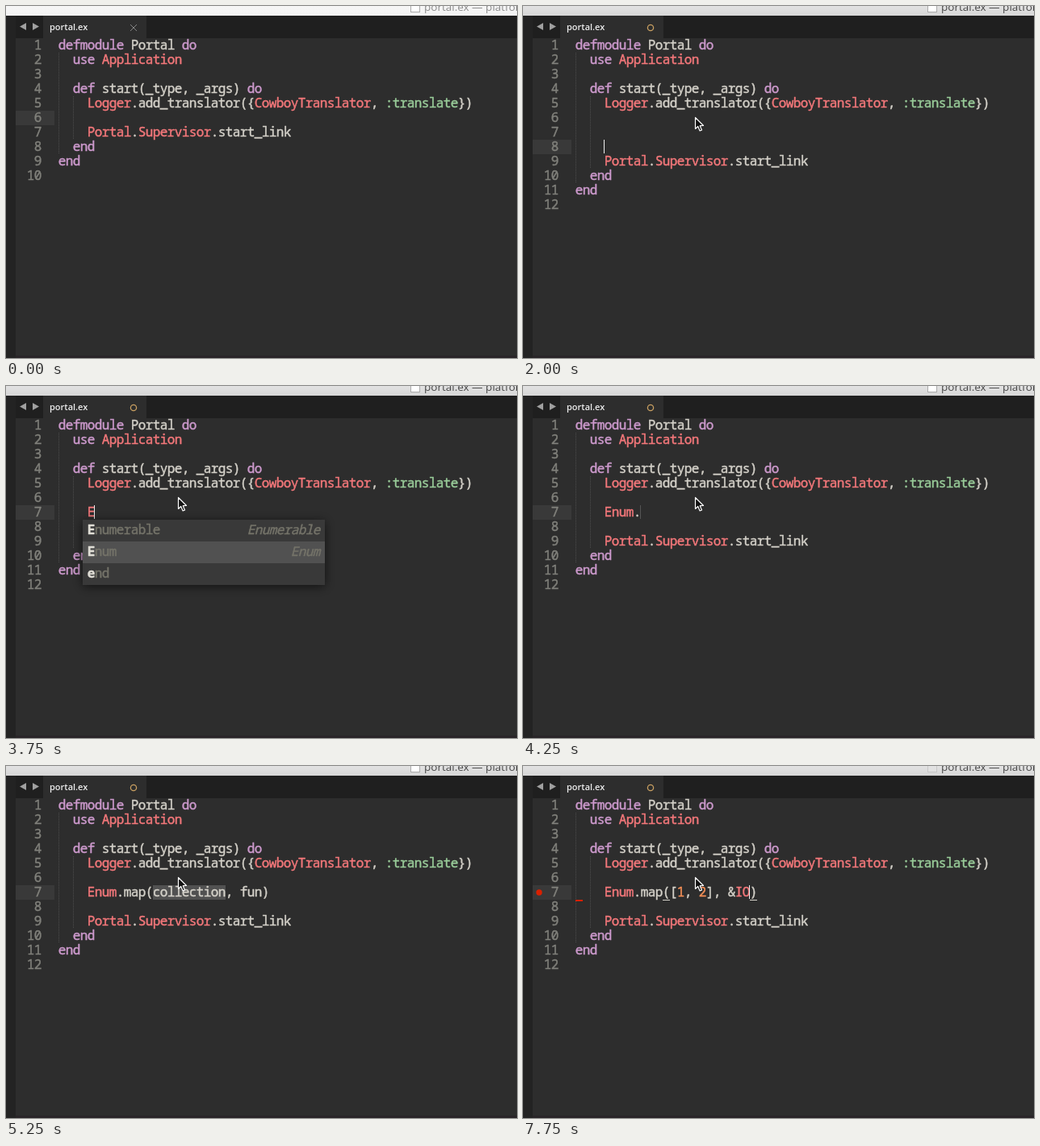
Animation, 633 px wide and 437 px high, one loop 8 s. Source, as an HTML page with a canvas:

```html
<!DOCTYPE html>
<html lang="en">
<head>
<meta charset="utf-8">
<title>Editor completion</title>
<style>
html, body { margin: 0; overflow: hidden; background: #2d2d2d; }
canvas { display: block; }
</style>
</head>
<body>
<canvas id="stage" width="633" height="437"></canvas>
<script>
const ctx = document.getElementById('stage').getContext('2d');
const LOOP = 8000, STEP = 250, CHAR = 9, ROW = 18, LEFT = 65, TOP = 40;
const MONO = '"Noto Sans Mono", monospace', SANS = '"Open Sans", sans-serif';
const FG = '#d3d0c8', DIM = '#747369', BG = '#2d2d2d', PURPLE = '#cc99cc',
  RED = '#f2777a', GREEN = '#99cc99', ORANGE = '#f99157';

const head = ['defmodule Portal do', '  use Application', '', '  def start(_type, _args) do',
  '    Logger.add_translator({CowboyTranslator, :translate})'];
const tail = ['    Portal.Supervisor.start_link', '  end', 'end', ''];

const enumMenu = { x: 95, width: 300, match: /^e/i, rows: ['Enumerable Enumerable', 'Enum Enum', 'end'] };
const mapMenu = { x: 140, width: 308, match: /ma/, rows: ['map map/2', 'max max/1', 'map_join map_join/1',
  'map_join map_join/3', 'map_reduce map_reduce/3', 'max_by max_by/2', 'filter_map filter_map/3', 'flat_map flat_map/2'] };

// Each step overrides part of the editor state from its time on.
const steps = [
  [0, { body: [''], row: 6, col: 4, caret: 0, picked: 0 }],
  [500, { active: true, mouse: [330, 14] }],
  [750, { mouse: [262, 84] }],
  [1000, { mouse: [222, 129] }],
  [1250, { mouse: [213, 138], caret: 1 }],
  [1500, { caret: .2 }],
  [1750, { body: ['', ''], row: 7, caret: 1, dirty: true }],
  [2000, { body: ['', '', ''], row: 8 }],
  [2250, { row: 7 }],
  [2750, { code: 'E', menu: enumMenu }],
  [3000, { picked: 1 }],
  [3250, { caret: .2 }],
  [3500, { caret: 0 }],
  [3750, { caret: 1 }],
  [4000, { code: 'Enum.', menu: null, picked: 0 }],
  [4250, { caret: .2 }],
  [4500, { code: 'Enum.m', menu: mapMenu, caret: 1 }],
  [4750, { code: 'Enum.ma' }],
  [5000, { caret: 0 }],
  [5250, { code: 'Enum.map(collection, fun)', menu: null, selection: [13, 10] }],
  [5750, { code: 'Enum.map([], fun)', selection: null, caret: 1, col: 14, pair: [13, 14] }],
  [6000, { code: 'Enum.map([1], fun)', col: 15, pair: [13, 15] }],
  [6250, { code: 'Enum.map([1, 2], fun)', col: 18, pair: [13, 18] }],
  [6750, { selection: [21, 3], caret: 0, pair: null }],
  [7000, { code: 'Enum.map([1, 2], &)', selection: null, caret: 1, col: 22, pair: [12, 22] }],
  [7250, { error: true, faded: true }],
  [7500, { code: 'Enum.map([1, 2], &I)', col: 23, pair: [12, 23] }],
  [7750, { code: 'Enum.map([1, 2], &IO)', col: 24, pair: [12, 24] }]
];

function rect(x, y, w, h, color) {
  ctx.fillStyle = color;
  ctx.fillRect(x, y, w, h);
}
function text(s, x, y, color, font) {
  ctx.font = font;
  ctx.fillStyle = color;
  ctx.fillText(s, x, y);
}
// Code text: tight 9px cells, thickened by a thin outline.
function mono(s, x, y, color, style = '500') {
  ctx.letterSpacing = '-0.6px';
  text(s, x - .3, y, color, `${style} 16px ${MONO}`);
  ctx.lineWidth = .45;
  ctx.strokeStyle = color;
  ctx.strokeText(s, x - .3, y);
  ctx.letterSpacing = '0px';
}
function monoRight(s, x, y, color, style) {
  mono(s, x - s.length * CHAR, y, color, style);
}
function polygon(points, color) {
  ctx.beginPath();
  points.forEach(p => ctx.lineTo(...p));
  ctx.closePath();
  ctx.fillStyle = color;
  ctx.fill();
}
function circle(x, y, r) {
  ctx.beginPath();
  ctx.arc(x, y, r, 0, 2 * Math.PI);
}
const rowY = n => TOP + (n - 1) * ROW;
const colX = n => LEFT + n * CHAR;

function tokenColor(word, line) {
  if (/^(defmodule|def|use|do|end)$/.test(word)) return PURPLE;
  if (/^:\w/.test(word)) return GREEN;
  if (/^\d/.test(word)) return ORANGE;
  return /^[A-Z]/.test(word) && !line.startsWith('defmodule') ? RED : FG;
}

function drawWindow(s) {
  rect(0, 0, 633, 437, BG);
  rect(0, 12, 12, 425, '#232323');
  rect(12, 12, 621, 28, '#1f1f1f');
  rect(46, 12, 128, 28, BG);
  rect(12, 434, 621, 3, '#292528');
  const bar = ctx.createLinearGradient(0, 0, 0, 12);
  bar.addColorStop(0, s.active ? '#e2e2e2' : '#f6f6f6');
  bar.addColorStop(1, s.active ? '#d6d6d6' : '#f3f3f3');
  rect(0, 0, 633, 12, bar);
  ctx.globalAlpha = s.faded ? .45 : 1;
  rect(501, 0, 12, 8, '#aaa');
  rect(502, 0, 10, 7, '#fff');
  ctx.globalAlpha = 1;
  text('portal.ex — platform', 518, 5.5, s.active ? '#484848' : '#8c8c8c', `13.5px ${SANS}`);
  polygon([[25, 21], [25, 30], [17, 25.5]], '#a0a0a0');
  polygon([[33, 21], [33, 30], [41, 25.5]], '#a0a0a0');
  text('portal.ex', 54, 30, '#eee', `600 11px ${SANS}`);
  ctx.lineWidth = 1.3;
  if (s.dirty) {
    circle(158, 27, 3.6);
    ctx.strokeStyle = '#c9a062';
  } else {
    ctx.lineWidth = 1;
    ctx.beginPath();
    ctx.moveTo(154, 23); ctx.lineTo(162, 31);
    ctx.moveTo(162, 23); ctx.lineTo(154, 31);
    ctx.strokeStyle = '#858585';
  }
  ctx.stroke();
}

function drawGuide(col, first, last) {
  for (let y = rowY(first); y < rowY(last + 1); y += 2) rect(colX(col), y, 1, 1, '#4c4c4c');
}

function drawCode(s) {
  const body = s.body.map((line, i) => i === 1 && s.code ? '    ' + s.code : line);
  const lines = [...head, ...body, ...tail], count = lines.length;
  rect(12, rowY(s.row), 48, ROW, '#393939');
  drawGuide(0, 2, count - 2);
  drawGuide(2, 5, count - 3);
  if (s.selection) rect(colX(s.selection[0]), rowY(7), s.selection[1] * CHAR, ROW, '#515151');
  lines.forEach((line, i) => {
    const y = rowY(i + 1) + 14;
    monoRight(String(i + 1), 44, y, '#80807b');
    for (const { 0: word, index } of line.matchAll(/:\w+|\w+|[^\w\s]/g))
      mono(word, colX(index), y, tokenColor(word, line));
  });
  (s.pair || []).forEach(col => rect(colX(col), 166, CHAR, 1, FG));
  if (s.error) {
    circle(20, 157, 3.7);
    ctx.fillStyle = '#d92000';
    ctx.fill();
    rect(65, 166, 9, 2, '#d92000');
  }
  ctx.globalAlpha = s.caret;
  const col = s.menu || /\.$/.test(s.code || '') ? 4 + s.code.length : s.col;
  rect(colX(col) - 1, rowY(s.row), 1, 17, '#eee');
  ctx.globalAlpha = 1;
}

function drawMenu({ x, width, match, rows }, picked, typed) {
  ctx.save();
  ctx.shadowColor = 'rgba(0,0,0,.6)';
  ctx.shadowBlur = 12;
  ctx.shadowOffsetY = 2;
  rect(x, 166, width, rows.length * 27, '#393939');
  ctx.restore();
  rows.forEach((row, i) => {
    const [name, hint = ''] = row.split(' '), y = 184 + i * 27;
    if (i === picked) rect(x, 166 + i * 27, width, 27, '#515151');
    const start = name.search(match), end = start + (typed === 'Enum.ma' ? 2 : 1);
    [...name].forEach((c, n) => {
      const hit = n >= start && n < end;
      mono(c, x + 6 + n * CHAR, y, hit ? '#e0ded6' : DIM, hit ? '700' : '500');
    });
    monoRight(hint, x + width - 6, y, DIM, 'italic 500');
  });
}

function drawMouse([x, y]) {
  ctx.save();
  ctx.translate(x + .5, y + .5);
  polygon([[0, 0], [0, 14], [3.2, 11], [5.6, 16.5], [8, 15.5], [5.7, 10.2], [10, 10]], '#111');
  ctx.lineWidth = 1.2;
  ctx.strokeStyle = '#fff';
  ctx.stroke();
  ctx.restore();
}

function draw(now) {
  const time = Math.floor(now % LOOP / STEP) * STEP;
  const state = Object.assign({}, ...steps.filter(([at]) => at <= time).map(([, change]) => change));
  drawWindow(state);
  drawCode(state);
  if (state.menu) drawMenu(state.menu, state.picked, state.code);
  if (state.mouse) drawMouse(state.mouse);
  requestAnimationFrame(() => draw(performance.now() - begin));
}
ctx.lineJoin = 'round';
const begin = performance.now();
draw(0);
</script>
</body>
</html>
```
